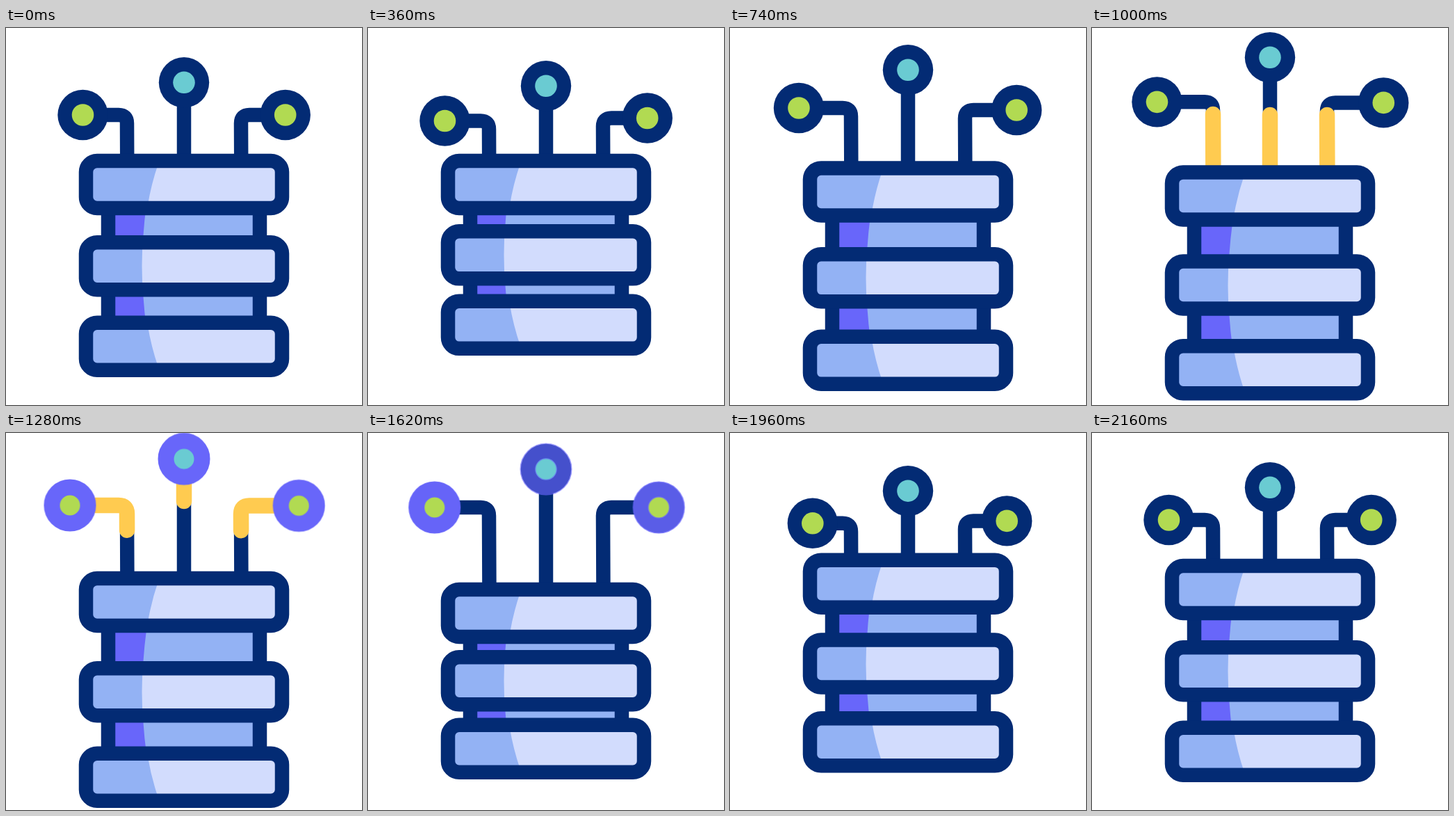
An HTML page without scripts for the animation above (2480 ms loop, 512 by 542 pixels).

```html
<!DOCTYPE html>
<html lang="en">
<head>
<meta charset="utf-8">
<title>Data stack</title>
<style>
:root {
  --in: cubic-bezier(.47,0,.745,.715);
  --out: cubic-bezier(.39,.575,.565,1);
  --io: cubic-bezier(.445,.05,.55,.95);
  --rise: cubic-bezier(.4,0,.7,.85);
  --navy: #032b74;
  --violet: #6866fa;
}
html, body { margin: 0; width: 100%; height: 100%; overflow: hidden; background: #fff; }
svg { display: block; width: 512px; height: 542px; }

.move, .ring, .pulse { animation: 2480ms infinite both var(--io); }
.line, .pulse { fill: none; stroke: var(--navy); stroke-width: 20.5; }
.pulse { stroke: #ffcb50; stroke-width: 22.5; stroke-linecap: round; animation-timing-function: linear; }
.side { stroke-dasharray: 130 600; animation-name: pulse-side; }
.center { stroke-dasharray: 90 600; animation-name: pulse-center; }
.ring { fill: none; stroke: var(--violet); stroke-width: 23; animation-name: glow; animation-timing-function: linear; }
.hub { fill: var(--navy); }
.green { fill: #b1da52; }
.teal { fill: #6acbd2; }
.pale { fill: #d2dcfd; }
.blue { fill: #93b2f4; }
.violet { fill: var(--violet); }
.edge { fill: none; stroke: var(--navy); stroke-width: 20.5; }

.top { animation-name: top; }
.mid { animation-name: mid; }
.low { animation-name: low; }
.cy { animation-name: cy; }
.lx { animation-name: lx; }
.ly { animation-name: ly; }
.rx { animation-name: rx; }
.ry { animation-name: ry; }

/* disks */
@keyframes top {
  0%, 14.52% { translate: 0 0; animation-timing-function: var(--rise); }
  29.84% { translate: 0 10.5px; animation-timing-function: var(--out); }
  51.61% { translate: 0 18px; }
  65.32% { translate: 0 34px; }
  73.39% { translate: 0 -13px; }
  87.1%, 100% { translate: 0 0; }
}
@keyframes mid {
  0%, 5.65% { translate: 0 0; }
  14.52% { translate: 0 -16px; animation-timing-function: var(--rise); }
  29.84% { translate: 0 17px; animation-timing-function: var(--out); }
  51.61% { translate: 0 30px; animation-timing-function: var(--in); }
  65.32% { translate: 0 14px; animation-timing-function: var(--out); }
  73.39% { translate: 0 -17px; }
  87.1%, 100% { translate: 0 0; }
}
@keyframes low {
  0%, 5.65% { translate: 0 0; }
  14.52% { translate: 0 -31px; animation-timing-function: var(--rise); }
  29.84% { translate: 0 20px; animation-timing-function: var(--out); }
  51.61% { translate: 0 37px; animation-timing-function: var(--in); }
  65.32% { translate: 0 -4px; animation-timing-function: var(--out); }
  73.39% { translate: 0 -21.2px; }
  87.1%, 100% { translate: 0 0; }
}

/* nodes */
@keyframes cy {
  0%, 5.65% { translate: 0 0; }
  14.52% { translate: 0 5px; animation-timing-function: var(--in); }
  29.84% { translate: 0 -18px; animation-timing-function: var(--out); }
  51.61% { translate: 0 -41px; }
  62.9% { translate: 0 -43px; animation-timing-function: var(--in); }
  70.97% { translate: 0 -11px; animation-timing-function: var(--out); }
  74.19% { translate: 0 7px; }
  87.1%, 100% { translate: 0 0; }
}
@keyframes lx {
  0%, 14.52% { translate: 0 0; animation-timing-function: var(--rise); }
  29.84% { translate: -11.5px 0; animation-timing-function: var(--out); }
  51.61% { translate: -18.5px 0; }
  60.48% { translate: -19px 0; animation-timing-function: var(--in); }
  65.32% { translate: -14.8px 0; animation-timing-function: var(--io); }
  73.39% { translate: 13px 0; }
  87.1%, 100% { translate: 0 0; }
}
@keyframes ly {
  0%, 5.65% { translate: 0 0; }
  14.52% { translate: 0 8.5px; animation-timing-function: var(--in); }
  29.84% { translate: 0 -10px; animation-timing-function: var(--out); }
  51.61% { translate: 0 -21px; }
  60.48% { translate: 0 -21.5px; animation-timing-function: var(--in); }
  65.32% { translate: 0 -18px; animation-timing-function: var(--io); }
  73.39% { translate: 0 7.5px; }
  87.1%, 100% { translate: 0 0; }
}
@keyframes rx {
  0%, 14.52% { translate: 0 0; animation-timing-function: var(--rise); }
  29.84% { translate: 10.5px 0; animation-timing-function: var(--out); }
  51.61% { translate: 19.5px 0; }
  64.11% { translate: 20.5px 0; animation-timing-function: var(--in); }
  70.97% { translate: 5px 0; animation-timing-function: var(--out); }
  74.19% { translate: -5px 0; }
  87.1%, 100% { translate: 0 0; }
}
@keyframes ry {
  0%, 5.65% { translate: 0 0; }
  14.52% { translate: 0 4.5px; animation-timing-function: var(--in); }
  29.84% { translate: 0 -7px; animation-timing-function: var(--out); }
  51.61% { translate: 0 -20.5px; }
  64.11% { translate: 0 -21.7px; animation-timing-function: var(--in); }
  70.97% { translate: 0 -7px; animation-timing-function: var(--out); }
  74.19% { translate: 0 2px; }
  87.1%, 100% { translate: 0 0; }
}

/* light running out to the nodes */
@keyframes pulse-side {
  0%, 30.65% { stroke-dashoffset: 94; }
  62.1%, 100% { stroke-dashoffset: -218; }
}
@keyframes pulse-center {
  0%, 30.65% { stroke-dashoffset: 59; }
  62.1%, 100% { stroke-dashoffset: -253; }
}
@keyframes glow {
  0%, 43.55% { opacity: 0; }
  47.58%, 63.71% { opacity: 1; }
  68.55%, 100% { opacity: 0; }
}
</style>
</head>
<body>
<svg viewBox="0 0 512 542">
  <defs>
    <rect id="plate" class="pale" x="115" y="10" width="282" height="68" rx="16"/>
    <rect id="rim" class="edge" x="115" y="10" width="282" height="68" rx="16"/>
  </defs>

  <g transform="translate(0 125)">
    <g class="move ly">
      <path class="line" d="M174.6 150 L174 12 q0-12 -12-12 H115"/>
      <path class="pulse side" d="M174.6 150 L174 12 q0-12 -12-12 H115"/>
      <g class="move lx">
        <circle class="hub" cx="110.5" r="36.2"/>
        <circle class="green" cx="110.5" r="15.8"/>
        <circle class="ring" cx="110.5" r="26" style="animation-delay:40ms"/>
      </g>
    </g>
    <g class="move ry">
      <path class="line" d="M338.6 150 L338 12 q0-12 12-12 H397"/>
      <path class="pulse side" d="M338.6 150 L338 12 q0-12 12-12 H397"/>
      <g class="move rx">
        <circle class="hub" cx="401.7" r="36.2"/>
        <circle class="green" cx="401.7" r="15.8"/>
        <circle class="ring" cx="401.7" r="26" style="animation-delay:25ms"/>
      </g>
    </g>
  </g>

  <g transform="translate(0 78.3)">
    <g class="move cy">
      <path class="line" d="M256 210 V0"/>
      <path class="pulse center" d="M256 210 V0"/>
      <circle class="hub" cx="256" r="36.2"/>
      <circle class="teal" cx="256" r="15.8"/>
      <circle class="ring" cx="256" r="26"/>
    </g>
  </g>

  <g transform="translate(0 298.3)">
    <g class="move mid">
      <path class="blue" d="M147-45 H365 V133 H147z"/>
      <path class="violet" d="M147-45 H202 Q190 44 202 133 H147z"/>
      <path class="edge" d="M147-45 V133 M365-45 V133"/>
      <use href="#plate"/>
      <path class="blue" d="M119 14 H196.2 Q194.8 44 196.2 74 H119z"/>
      <use href="#rim"/>
    </g>
  </g>

  <g transform="translate(0 181)">
    <g class="move top">
      <use href="#plate"/>
      <path class="blue" d="M119 14 H219 Q209 43 203.8 74 H119z"/>
      <use href="#rim"/>
    </g>
  </g>

  <g transform="translate(0 413.8)">
    <g class="move low">
      <use href="#plate"/>
      <path class="blue" d="M119 14 H203.8 Q209 45 219 74 H119z"/>
      <use href="#rim"/>
    </g>
  </g>
</svg>
</body>
</html>
```
